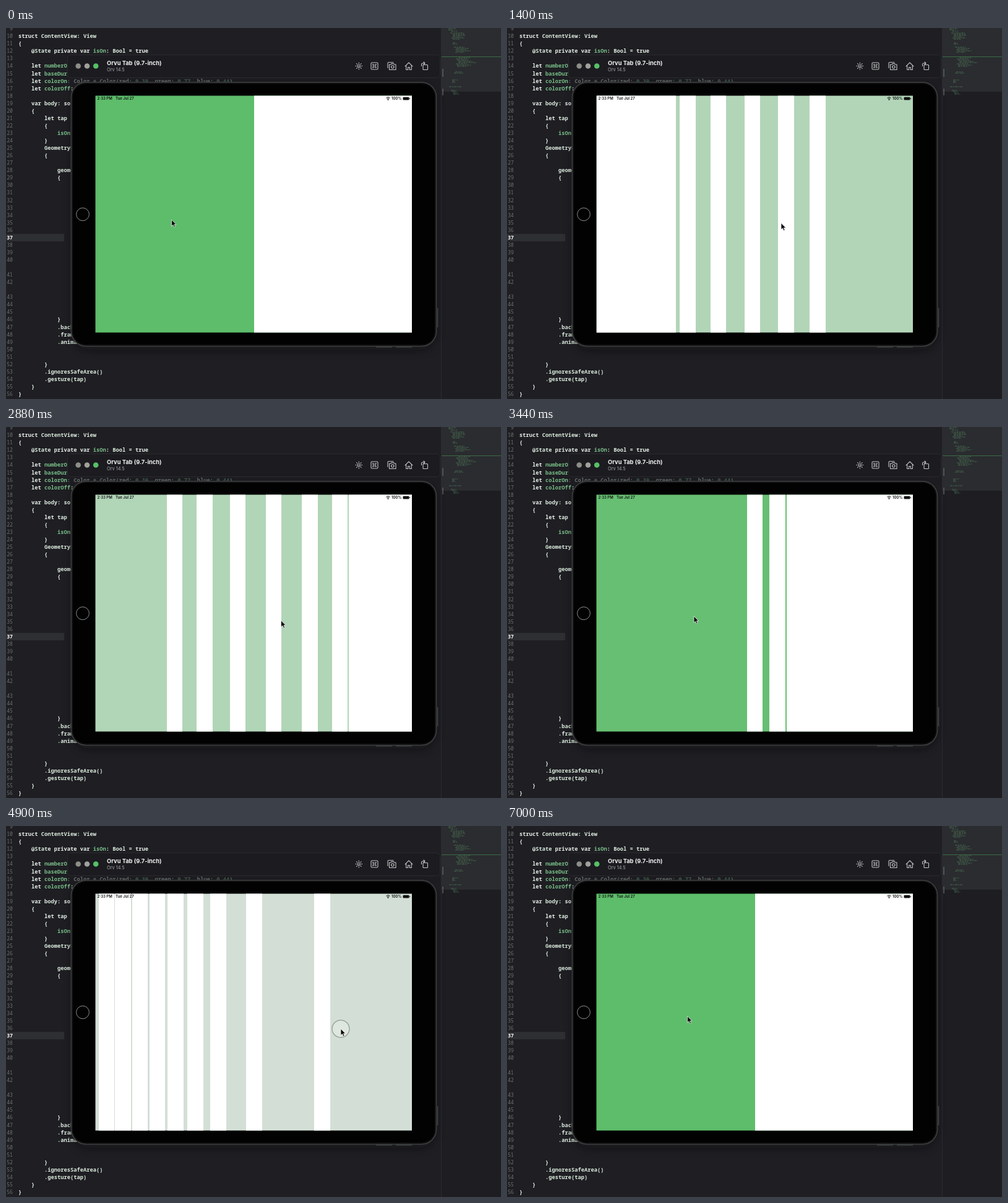
Recreate the animation shown at these times as an HTML page. Size 800x600 px, loop 7.02 s.

```html
<!DOCTYPE html>
<html lang="en">
<head>
<meta charset="utf-8">
<title>Sliding bars</title>
<style>
  html, body { margin: 0; width: 100%; height: 100%; overflow: hidden; background: #1e1e23; }
  svg { display: block; width: 800px; height: 600px; }
  text { white-space: pre; }
  .code { font: 600 8.75px "Noto Sans Mono", "DejaVu Sans Mono", monospace; fill: #dcebdd; }
  .code .id { fill: #79bd87; }
  .code .kw { font-weight: 700; fill: #e6eee6; }
  .num { font: 400 8.2px "Noto Sans Mono", "DejaVu Sans Mono", monospace; fill: #6b716d; text-anchor: end; }
  .num.now { fill: #fff; font-weight: 700; }
  .ui { font-family: Inter, "Open Sans", sans-serif; }
  .icon { fill: none; stroke: #c3c6c3; stroke-width: 1.1; stroke-linecap: round; stroke-linejoin: round; }
  #bars rect { fill: #fff; shape-rendering: crispEdges; }
</style>
</head>
<body>
<svg viewBox="0 0 800 600">
  <defs>
    <filter id="blur" x="-20%" y="-20%" width="140%" height="140%"><feGaussianBlur stdDeviation="8"/></filter>
    <clipPath id="glass"><rect x="144.5" y="109.4" width="511.5" height="383.2"/></clipPath>
  </defs>
  <rect width="800" height="600" fill="#1e1e23"/>
  <rect y="333" width="94" height="12" fill="#2e2f33"/>
  <g id="editor"></g>

  <!-- minimap -->
  <rect x="703" width="97" height="600" fill="#1d1d22"/>
  <rect x="704" width="96" height="103" fill="#2a2c2f"/>
  <path d="M703.5 0V600" stroke="#2b2c31"/>
  <path d="M704 46.5H800" stroke="#3b6b46"/>
  <path d="M706 66V79M706 98V109" stroke="#5c6162" stroke-width="1.5"/>
  <g id="map"></g>

  <!-- simulator window -->
  <rect x="108" y="92" width="586" height="428" rx="26" fill="#08080b" opacity=".45" filter="url(#blur)"/>
  <rect x="99" y="80" width="603" height="14" fill="#1c1c21" opacity=".6"/>
  <rect x="99.5" y="43.5" width="602" height="37" rx="5" fill="#1b1b20" stroke="#29292e"/>
  <circle cx="116.7" cy="61.5" r="4.3" fill="#8d8e87"/>
  <circle cx="131" cy="61.5" r="4.3" fill="#a0a19b"/>
  <circle cx="145.2" cy="61.5" r="4.3" fill="#57c067"/>
  <text class="ui" x="163" y="60.4" font-size="9.3" font-weight="700" fill="#f1f3f1">Orvu Tab (9.7-inch)</text>
  <text class="ui" x="163" y="70.2" font-size="7.4" fill="#a5aaa6">Orv 14.5</text>
  <g class="icon">
    <circle cx="570.3" cy="61.5" r="2"/>
    <path id="rays"/>
    <rect x="590" y="56" width="11" height="11" rx="1.5"/>
    <path d="M594 60h3v3h-3zM594 60h-.8a.8.8 0 1 1 .8-.8zM597 60v-.8a.8.8 0 1 1 .8.8zM597 63h.8a.8.8 0 1 1-.8.8zM594 63v.8a.8.8 0 1 1-.8-.8z" stroke-width=".8"/>
    <path d="M617 64.5V57a1.5 1.5 0 0 1 1.5-1.5H626"/>
    <path d="M619.5 59h2.5l1-1.4h3.5l1 1.4h2.5v8.5h-10.5z"/>
    <circle cx="624.8" cy="63" r="2.2"/>
    <path d="M645 61.8L651 56l6 5.800M646.7 60.5V67.5h3v-4h2.6v4h3V60.5"/>
    <rect x="674" y="59.5" width="7.5" height="8" rx="1"/>
    <path d="M671.5 61.5V59a2 2 0 0 1 2-2h3M675 55l2 2-2 2"/>
  </g>

  <!-- tablet -->
  <path d="M697.5 453V484M598 516h26M630 516h26" stroke="#3c4440" stroke-width="1.6"/>
  <rect x="105.5" y="87.8" width="590" height="426.8" rx="24" fill="#020203" stroke="#3c3d3e" stroke-width="1.8"/>
  <rect x="107.5" y="89.8" width="586" height="422.8" rx="22" fill="none" stroke="#151516"/>
  <circle cx="124" cy="301.3" r="10.4" fill="none" stroke="#9a9d9a" stroke-width=".9"/>
  <g clip-path="url(#glass)">
    <rect id="back" x="144" y="109" width="512" height="384"/>
    <g id="bars"></g>
    <g class="ui" font-size="6" font-weight="600" fill="#111">
      <text x="147.5" y="116.3">2:33 PM</text>
      <text x="177" y="116.3">Tue Jul 27</text>
      <text x="623" y="116.3">100%</text>
    </g>
    <path d="M614.5 113.2a4.3 4.3 0 0 1 6 0M615.7 114.6a2.6 2.6 0 0 1 3.6 0" fill="none" stroke="#111"/>
    <circle cx="617.5" cy="116" r=".9" fill="#111"/>
    <rect x="641.5" y="111.8" width="10" height="4.8" rx="1.3" fill="#111"/>
    <path d="M652.6 113.3v1.8" stroke="#111" stroke-width=".9"/>
    <circle id="touch" r="14" fill="#fff" fill-opacity=".3" stroke="#8c918d" stroke-width="1.5"/>
  </g>
  <path id="cursor" d="M0 0V10.5L2.5 8.3L4.2 12.2L6 11.4L4.4 7.7H7.7Z" fill="#080808" stroke="#fff" stroke-width=".7"/>
</svg>
<script>
const NS = "http://www.w3.org/2000/svg";
const $ = id => document.getElementById(id);
function add(parent, tag, attrs, text) {
  const el = document.createElementNS(NS, tag);
  for (const k in attrs) el.setAttribute(k, attrs[k]);
  if (text) el.textContent = text;
  return parent.appendChild(el);
}

// Code: line number, indent, text; *keyword* and _identifier_ are marked.
const lines = [
  [10, 0, "*struct* ContentView: View"], [11, 0, "{"],
  [12, 4, "@State *private var* _isOn_: Bool = *true*"],
  [14, 4, "*let* _numberOfBars_"], [15, 4, "*let* _baseDuration_"],
  [16, 4, "*let* _colorOn_: Color = Color(red: _0.39_, green: _0.77_, blue: _0.44_)"],
  [17, 4, "*let* _colorOff_:"], [19, 4, "*var* body: *some* View"], [20, 4, "{"],
  [21, 8, "*let* tap"], [22, 8, "{"], [23, 12, "_isOn_"], [24, 8, "}"],
  [25, 8, "GeometryReader"], [26, 8, "{"], [28, 12, "geometry"], [29, 12, "{"],
  [46, 12, "}"], [47, 12, ".background"], [48, 12, ".frame"], [49, 12, ".animation"],
  [52, 8, "}"], [53, 8, ".ignoresSafeArea()"], [54, 8, ".gesture(tap)"],
  [55, 4, "}"], [56, 0, "}"]
];
// Lines 40 and 42 wrap, so later lines sit one row lower.
const lineY = n => 16.2 + 12.06 * (n - 10 + (n > 40) + (n > 42));
const editor = $("editor");
for (let n = 9; n <= 56; n++)
  add(editor, "text", { class: n === 37 ? "num now" : "num", x: 11, y: lineY(n) }, String(n));
const tailLimit = { 14: 11, 15: 11, 17: 13, 19: 12 };
for (const [n, indent, src] of lines) {
  const el = add(editor, "text", { class: "code", x: 20 + indent * 5.25, y: lineY(n) });
  let room = tailLimit[n] || 99;
  for (const part of src.split(/(\*[^*]+\*|_[^_]+_)/)) {
    const kind = part[0] === "*" ? "kw" : part[0] === "_" ? "id" : "";
    const word = (kind ? part.slice(1, -1) : part).slice(0, room);
    room -= word.length;
    if (word) add(el, "tspan", { class: kind }, word);
  }
}

// Minimap: groups of tiny lines as [x, y, rows, longest].
let seed = 7;
const rand = () => (seed = seed * 16807 % 2147483647) / 2147483647;
for (const [x, y, rows, len] of [[715, 1, 3, 14], [718, 8, 6, 26], [718, 24, 2, 8],
  [724, 31, 5, 24], [727, 48, 8, 32], [722, 71, 2, 25], [719, 84, 3, 10], [714, 95, 1, 32], [719, 101, 4, 12]])
  for (let r = 0; r < rows; r++)
    add($("map"), "path", {
      d: `M${x + Math.floor(rand() * 3) * 2} ${y + r * 2}h${len * (.4 + .6 * rand())}`,
      stroke: "#5b8a66", "stroke-width": .9, "stroke-dasharray": "4 1 2 1", opacity: .7
    });

let rays = "";
for (let a = 0; a < 8; a++) {
  const c = Math.cos(a * Math.PI / 4), s = Math.sin(a * Math.PI / 4);
  rays += `M${570.3 + 4 * c} ${61.5 + 4 * s}L${570.3 + 5.4 * c} ${61.5 + 5.4 * s}`;
}
$("rays").setAttribute("d", rays);

// Motion
const LOOP = 7020, COUNT = 10, BASE = 151;
const MID = 400.6, HALF = 255.8, BAR = HALF / COUNT;
const ON = [93, 189, 106], OFF = [235, 231, 237], GAMMA = 1.4;
const taps = [[597, 268, 310], [2170, 525, 317], [3830, 293, 305], [4751, 541, 328]];
const path = [[0, 267.5, 310], [750, 268, 310], [1400, 443, 315.5], [1900, 526, 317], [2560, 526, 317],
  [3440, 302, 306], [3700, 293, 305], [3880, 293, 305], [4200, 506.5, 319], [4500, 541, 328],
  [5700, 541, 328], [6500, 291.5, 307.5], [7020, 291.5, 307.5]];

const clamp = v => Math.min(1, Math.max(0, v));
// cubic-bezier(.42, 0, .58, 1)
function ease(x) {
  if (x <= 0 || x >= 1) return clamp(x);
  let lo = 0, hi = 1, s;
  for (let i = 0; i < 24; i++) {
    s = (lo + hi) / 2;
    const u = 1 - s;
    if (1.26 * u * u * s + 1.74 * u * s * s + s * s * s < x) lo = s; else hi = s;
  }
  return s * s * (3 - 2 * s);
}

// Overlapping moves add up: 0 is right and on, 1 is left and off.
function shift(t, leftTime, rightTime) {
  return taps.reduce((sum, [start], i) =>
    sum + (i % 2 ? -ease((t - start) / rightTime) : ease((t - start) / leftTime)), 0);
}

function mix(a, b, k) {
  const p = a ** GAMMA, q = b ** GAMMA;
  return Math.round((p + (q - p) * k) ** (1 / GAMMA));
}

function cursorAt(t) {
  let i = 0;
  while (i < path.length - 2 && t >= path[i + 1][0]) i++;
  const [t0, x0, y0] = path[i], [t1, x1, y1] = path[i + 1];
  const k = clamp((t - t0) / (t1 - t0));
  return [x0 + (x1 - x0) * k, y0 + (y1 - y0) * k];
}

const bars = Array.from({ length: COUNT }, () =>
  add($("bars"), "rect", { y: 109, width: BAR, height: 384 }));

function draw(t) {
  const off = clamp(shift(t, COUNT * BASE, COUNT * BASE));
  $("back").setAttribute("fill", `rgb(${ON.map((c, i) => mix(c, OFF[i], off))})`);
  bars.forEach((bar, i) => {
    const f = shift(t, (i + 1) * BASE, (COUNT - i) * BASE);
    bar.setAttribute("x", MID + i * BAR - HALF * f);
  });
  const tap = taps.find(([s]) => t >= s - 120 && t < s + 550);
  $("touch").setAttribute("opacity", tap ? 1 - clamp((t - tap[0]) / 550) : 0);
  if (tap) $("touch").setAttribute("transform", `translate(${tap[1]} ${tap[2]})`);
  $("cursor").setAttribute("transform", `translate(${cursorAt(t)})`);
}

const begin = performance.now();
function tick() {
  const t = (performance.now() - begin) % LOOP;
  draw(Math.floor(t / 20) * 20);
  requestAnimationFrame(tick);
}
tick();
</script>
</body>
</html>
```
